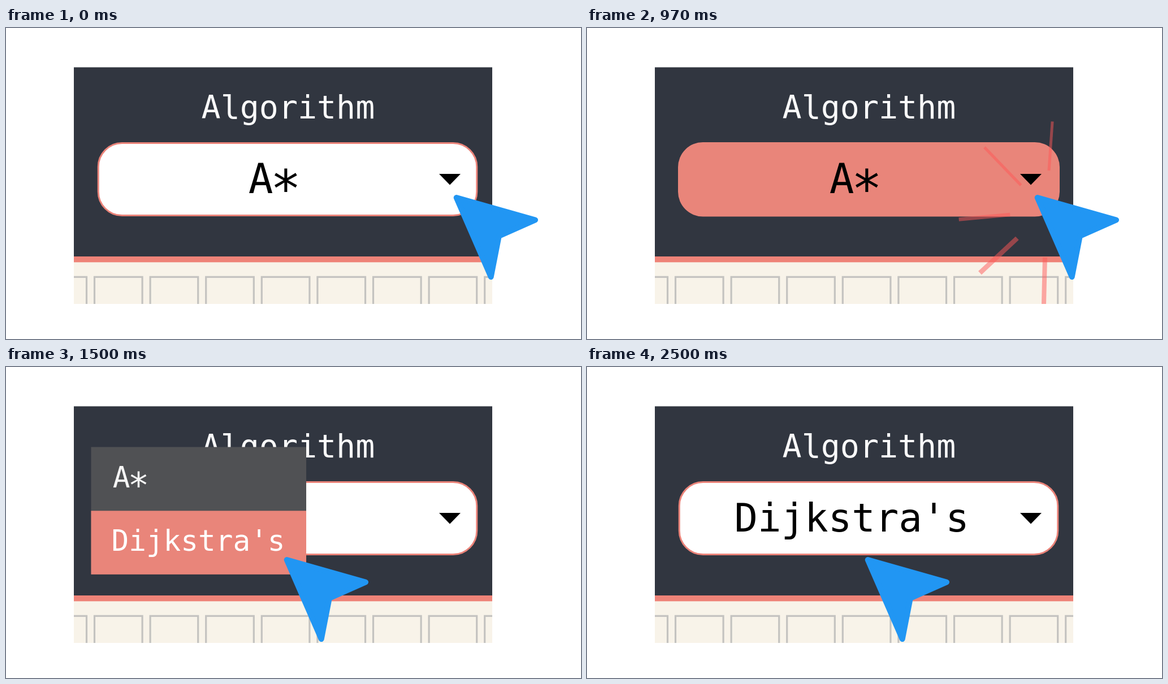
Animation, 1017 px wide and 550 px high, one loop 3.51 s. Source, as an HTML page:

```html
<!DOCTYPE html>
<html lang="en">
<head>
<meta charset="utf-8">
<title>Algorithm picker</title>
<style>
  html, body { margin: 0; width: 100%; height: 100%; overflow: hidden; background: #fff; }
  svg { display: block; width: 1017px; height: 550px; }
  text { font-family: "DejaVu Sans Mono", monospace; white-space: pre; }
  .mid { text-anchor: middle; }
  .menu text { font-size: 51px; fill: #f6f6f6; }
  .menu .star { font-size: 63px; }
  .value { font-size: 72.5px; }
  .value .star { font-size: 90px; }
  .red { fill: none; stroke: #ff5757; }
</style>
</head>
<body>
<svg viewBox="0 0 1017 550">
  <defs>
    <clipPath id="panel"><rect x="120" y="69.5" width="740" height="418.5"/></clipPath>
  </defs>

  <g clip-path="url(#panel)">
    <rect x="120" y="69" width="740" height="336" fill="#313640"/>
    <rect x="120" y="414" width="740" height="75" fill="#f8f3e9"/>
    <rect x="120" y="404" width="740" height="10.3" fill="#ee8378"/>
    <g id="cells" fill="none" stroke="#c4c3c0" stroke-width="3.2"></g>
  </g>

  <text x="345.6" y="160" font-size="56.6" fill="#fafafa">Algorithm</text>

  <rect id="idle" x="163.2" y="203.6" width="669.6" height="128" rx="42" fill="#fff" stroke="#ea8379" stroke-width="3"/>
  <rect id="pressed" x="161" y="202" width="675" height="131.5" rx="44" fill="#e9857a"/>
  <g id="astar" class="value">
    <text class="mid" x="450.7" y="292">A</text>
    <text class="mid star" x="494.8" y="316">*</text>
  </g>
  <text id="dijkstra" x="260.5" y="291" font-size="69">Dijkstra's</text>
  <path d="M766 258H804L785 277.5Z"/>

  <g id="menu" class="menu">
    <rect x="150.5" y="141.5" width="380.5" height="225" fill="#505154"/>
    <rect id="hover" x="150.5" y="254.3" width="380.5" height="112.5" fill="#e9857a"/>
    <text class="mid" x="204" y="213">A</text>
    <text class="mid star" x="234.5" y="230.5">*</text>
    <text id="option" x="186.5" y="327">Dijkstra's</text>
  </g>

  <g id="burstClip"><g id="burst" class="red"></g></g>

  <g id="pointer">
    <path id="ring" class="red" d="M878 297A81.8 81.8 0 1 0 800 382" stroke-width="9.8" stroke-linecap="round"/>
    <path d="M796.7 300L936 339.5L871.8 367.8L857.7 440Z" fill="#2196f3" stroke="#2196f3" stroke-width="10" stroke-linejoin="round"/>
  </g>
</svg>

<script>
const LOOP = 3510;
const $ = id => document.getElementById(id);

function add(parent, tag, attrs) {
  const node = document.createElementNS("http://www.w3.org/2000/svg", tag);
  for (const key in attrs) node.setAttribute(key, attrs[key]);
  parent.append(node);
}

for (let i = -1; i < 8; i++)
  add($("cells"), "rect", { x: 156.5 + i * 98.6, y: 440.3, width: 84.6, height: 80 });

// Rays around the click: angle in degrees, inner radius, outer radius, width.
const rays = [
  [-86, 72, 159, 5], [-134, 64, 157, 5], [174.6, 64, 155, 6.5], [137, 70, 160, 8.5],
  [91.4, 82, 168, 8], [47, 70, 160, 8], [-4, 72, 174, 6.5], [-43, 68, 160, 5]
];
for (const [angle, inner, outer, width] of rays)
  add($("burst"), "path", {
    d: `M${inner} 0H${outer}`,
    transform: `translate(812 324) rotate(${angle})`,
    "stroke-width": width
  });

// Each step: start time, visible parts, burst opacity, whether the pointer has moved.
const steps = [
  [0, "idle astar", 0, false],
  [500, "pressed astar ring", 0, false],
  [800, "pressed astar", 1, false],
  [970, "pressed astar", 0.5, false],
  [1000, "idle menu", 0, false],
  [1500, "idle menu hover", 0, true],
  [2000, "idle menu hover ring", 0, true],
  [2300, "idle dijkstra", 1, true],
  [2470, "idle dijkstra", 0.5, true],
  [2500, "idle dijkstra", 0, true]
];
const parts = ["idle", "pressed", "astar", "dijkstra", "menu", "hover", "ring"];

function show([, visible, glow, moved]) {
  const on = visible.split(" ");
  for (const id of parts) $(id).style.display = on.includes(id) ? "" : "none";
  const hovered = on.includes("hover");
  $("option").setAttribute("y", hovered ? 325 : 327);
  $("option").style.fill = hovered ? "#fff" : "";
  $("burst").style.opacity = glow;
  $("burst").setAttribute("transform", moved ? "translate(-303 26)" : "");
  // A fading burst only shows on the panel.
  $("burstClip").setAttribute("clip-path", glow < 1 ? "url(#panel)" : "none");
  $("pointer").setAttribute("transform", moved ? "translate(-300 41)" : "");
}

let current;
const start = performance.now();
function tick() {
  const t = (performance.now() - start) % LOOP;
  const step = steps.findLast(s => s[0] <= t);
  if (step !== current) show(current = step);
  requestAnimationFrame(tick);
}
tick();
</script>
</body>
</html>
```
